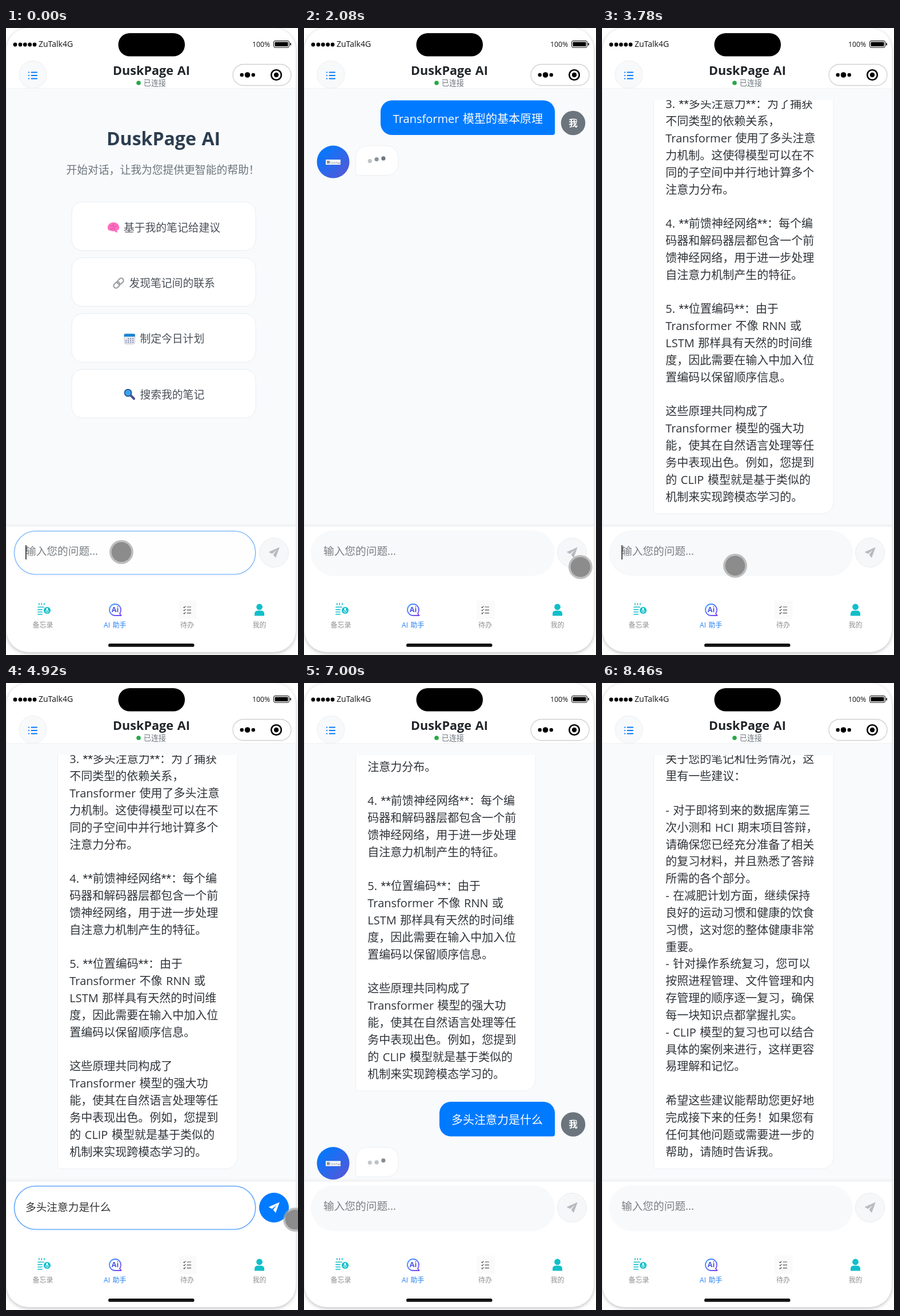
An HTML page for the animation above (9 s loop, 511x1096 px).

```html
<!DOCTYPE html>
<html lang="zh-CN">
<head>
<meta charset="utf-8">
<title>DuskPage AI</title>
<style>
  html, body { margin: 0; width: 100%; height: 100%; overflow: hidden; background: #fff; }
  svg { display: block; width: 100vw; height: 100vh; }
  text { font-family: 'Open Sans', 'Noto Sans CJK SC', 'Noto Sans CJK', sans-serif; white-space: pre; word-spacing: 1.3px; }
  .star { font-family: Roboto, sans-serif; }
  .phone { filter: drop-shadow(0 2px 3px rgba(0, 0, 0, .25)); }
</style>
</head>
<body>
<svg id="stage" viewBox="0 0 511 1096" xmlns="http://www.w3.org/2000/svg"></svg>
<script>
const LOOP = 9000;
const BRAND = 'DuskPage AI';
const BLUE = '#007aff';
const ASK = ['Transformer 模型的基本原理', '多头注意力是什么'];
const SENT = [1960, 5120];
const ANSWERED = [3460, 7480];

const ANSWER_1 = `3. **多头注意力**：为了捕获
不同类型的依赖关系，
Transformer 使用了多头注意
力机制。这使得模型可以在不
同的子空间中并行地计算多个
注意力分布。

4. **前馈神经网络**：每个编
码器和解码器层都包含一个前
馈神经网络，用于进一步处理
自注意力机制产生的特征。

5. **位置编码**：由于
Transformer 不像 RNN 或
LSTM 那样具有天然的时间维
度，因此需要在输入中加入位
置编码以保留顺序信息。

这些原理共同构成了
Transformer 模型的强大功
能，使其在自然语言处理等任
务中表现出色。例如，您提到
的 CLIP 模型就是基于类似的
机制来实现跨模态学习的。`;

const ANSWER_2 = `关于您的笔记和任务情况，这
里有一些建议：

- 对于即将到来的数据库第三
次小测和 HCI 期末项目答辩，
请确保您已经充分准备了相关
的复习材料，并且熟悉了答辩
所需的各个部分。
- 在减肥计划方面，继续保持
良好的运动习惯和健康的饮食
习惯，这对您的整体健康非常
重要。
- 针对操作系统复习，您可以
按照进程管理、文件管理和内
存管理的顺序逐一复习，确保
每一块知识点都掌握扎实。
- CLIP 模型的复习也可以结合
具体的案例来进行，这样更容
易理解和记忆。

希望这些建议能帮助您更好地
完成接下来的任务！如果您有
任何其他问题或需要进一步的
帮助，请随时告诉我。`;

// ---------- drawing helpers ----------
const text = (x, y, size, fill, str, extra = '') =>
  `<text x="${x}" y="${y}" font-size="${size}" fill="${fill}" ${extra}>${str}</text>`;
const rect = (x, y, w, h, r, fill, extra = '') =>
  `<rect x="${x}" y="${y}" width="${w}" height="${h}" rx="${r}" fill="${fill}" ${extra}/>`;
const circle = (x, y, r, fill, extra = '') =>
  `<circle cx="${x}" cy="${y}" r="${r}" fill="${fill}" ${extra}/>`;
const path = (d, fill, extra = '') => `<path d="${d}" fill="${fill}" ${extra}/>`;
const group = (id, body, extra = '') => `<g id="${id}" ${extra}>${body}</g>`;
const mid = 'text-anchor="middle"';

// Rounded bubble with one tight bottom corner.
function bubble(x0, y0, x1, y1, tail, fill, extra) {
  const R = 20, br = tail === 'right' ? 4 : R, bl = tail === 'left' ? 4 : R;
  return path(`M${x0 + R} ${y0}H${x1 - R}a${R} ${R} 0 0 1 ${R} ${R}V${y1 - br}` +
    `a${br} ${br} 0 0 1 ${-br} ${br}H${x0 + bl}a${bl} ${bl} 0 0 1 ${-bl} ${-bl}V${y0 + R}` +
    `a${R} ${R} 0 0 1 ${R} ${-R}z`, fill, extra);
}
const edge = 'stroke="#eceff2"';

function answer(id, str) {
  const lines = str.split('\n');
  const body = lines.map((line, i) => text(111.3, 826.5 - 29.83 * (lines.length - 1 - i), 20, '#2f3338',
    line.replace(/\*\*/g, '<tspan class="star">**</tspan>'))).join('');
  return group(id, bubble(90.5, 40, 405, 849, 'left', '#fff', edge) + body);
}

// A question on the right, the waiting reply on the left.
function turn(id, left, str) {
  const dots = [0, 1, 2].map(i => circle(115.3 + 11.8 * i, 0, 3.6, '#6c757d', 'class="dot"')).join('');
  return group(id,
    bubble(left, 126.5, 439, 187, 'right', BLUE, '') +
    text(418, 165.5, 20, '#fff', str, 'text-anchor="end" font-weight="500"') +
    circle(471, 166, 21.3, '#6c757d') +
    text(471, 171.8, 15.5, '#fff', '我', mid + ' font-weight="700"') +
    circle(51, 234, 28.5, 'url(#bot)') +
    rect(38, 230, 26, 9, 0, '#f4f6f8') + rect(40, 232, 5, 5, 0, '#8a949c') +
    text(46, 236.6, 4, '#6c757d', 'DuskPage') +
    bubble(90.5, 206, 165, 257.5, 'left', '#fff', edge) + dots);
}

// ---------- pieces ----------
const brain = path('M178 350c-1-5 3-9 8-10 6-1 11 2 12 7 1 4-1 6-4 7l1 3c-3 1-4-1-5-2-3 1-5 0-7-1-3 0-5-1-5-4z', '#ff6fc0') +
  path('M182 347q3-3 6 0t6-1M183 352q4-3 7 0M188 342v3', 'none', 'stroke="#d63f9c" stroke-linecap="round"');
const link = `<g fill="none" stroke="#9a9da1" stroke-width="2.2" transform="rotate(-45 197 446)">` +
  rect(186.5, 442, 12, 8, 4, 'none') + rect(195.5, 442, 12, 8, 4, 'none') + '</g>';
const calendar = rect(207, 535, 18.5, 17.5, 3, '#e9eaf0', 'stroke="#bfc3d0" stroke-width=".8"') +
  path('M206.6 539.5v-3a2 2 0 0 1 2-2h15.3a2 2 0 0 1 2 2v3z', '#1583d6') +
  Array.from({ length: 11 }, (_, i) =>
    rect(209 + 4 * ((i + 1) % 4), 542 + 3.3 * Math.floor((i + 1) / 4), 2.3, 2, .5, '#8b94b4')).join('');
const lens = path('M218 642l6 6', 'none', 'stroke="#4a4f8f" stroke-width="4" stroke-linecap="round"') +
  circle(213.5, 637.8, 6, '#35a5ef', 'stroke="#33599b" stroke-width="2"');

const cards = [['基于我的笔记给建议', 206, brain], ['发现笔记间的联系', 215.5, link],
  ['制定今日计划', 234.5, calendar], ['搜索我的笔记', 234.5, lens]]
  .map(([label, x, icon], i) => rect(115, 304 + 97.6 * i, 322, 85, 19, '#fff', 'stroke="#e9ecef"') +
    icon + text(x, 355.6 + 97.4 * i, 18.8, '#495057', label)).join('');

const welcome = group('welcome',
  text(275.5, 205, 32, '#2c3e50', BRAND, mid + ' font-weight="700"') +
  text(105.5, 255, 18.8, '#6c757d', '开始对话，让我为您提供更智能的帮助！') + cards);

const header =
  [16, 25, 33.3, 41.7, 50].map(x => circle(x, 29, 3.4, '#000')).join('') +
  text(57, 33, 14, '#111', 'ZuTalk4G') +
  rect(196.5, 9, 116.5, 40.5, 20, '#000') +
  text(431, 33, 12.3, '#111', '100%') +
  rect(468.5, 22.5, 27, 11.5, 2.5, '#fff', 'stroke="#000"') + rect(470.5, 24.5, 23, 7.5, 1, '#000') +
  rect(497, 26, 1.8, 4.5, .8, '#000') +
  circle(47, 81.5, 24, '#f8f9fa', 'stroke="#eceef0"') +
  [77.5, 83, 88.5].map(y => rect(39, y - 1, 2, 2, .6, BLUE) + rect(43.5, y - .9, 11.5, 1.8, .9, BLUE)).join('') +
  text(254.5, 82, 21.6, '#212529', BRAND, mid + ' font-weight="700"') +
  circle(232, 96, 3.8, '#28a745') + text(240.8, 100.6, 13.1, '#6c757d', '已连接') +
  rect(397, 63.5, 102, 37, 18.5, '#fff', 'stroke="#d0d0d0" stroke-width="1.3"') +
  circle(412.7, 82, 3.2, '#000') + circle(422.5, 82, 4.8, '#000') + circle(432.7, 82, 3.2, '#000') +
  circle(473, 82, 8.8, 'none', 'stroke="#000" stroke-width="2.6"') + circle(473, 82, 4.2, '#000');

const composer = rect(1, 866, 506, 6, 0, 'url(#lift)') + rect(1, 871.5, 506, 160, 0, '#fff') +
  rect(12, 878, 427, 80, 40, '#f8f9fa', 'id="idle"') +
  group('focus', rect(13.5, 878.5, 424, 78, 38, 'none', 'stroke="#007bff" stroke-opacity=".05" stroke-width="4"') +
    rect(14.7, 879.5, 421.8, 75.5, 37, '#fff', 'stroke="#2b8afa" stroke-width="1.1"')) +
  text(34, 920.5, 18.7, '#7b7f83', '输入您的问题...', 'id="hint"') +
  text(34, 923.2, 18.7, '#333', '', 'id="entry"') +
  rect(0, 904, 1.5, 25, 0, '#111', 'id="caret"') +
  circle(469, 917, 25.5, '#f6f7f8', 'id="send"') +
  path('M478.8 907.5L459.5 916l6 3.2 8.3-6.6-6.3 8.2 4.4 5.4z', '#b7bbbf', 'id="plane" stroke-linejoin="round"');

const TEAL = '#10bfca';
const tabs =
  [1011.5, 1015.8, 1020, 1024].map((y, i) => rect(55, y, i ? 9 : 12, 1.6, .8, TEAL)).join('') +
  [57, 61.5, 66].map(x => rect(x, 1005, 1.6, 4, .8, TEAL)).join('') +
  circle(72, 1018, 6, TEAL) + rect(70.6, 1013.8, 2.8, 5, 1.4, '#fff') +
  path('M69 1018a3 3 0 0 0 6 0M72 1021v1.5', 'none', 'stroke="#fff" stroke-width=".9"') +
  path('M201.5 1027h-10.5a10 10 0 1 1 10-10q0 4-2 6.5z', '#fff', 'stroke="url(#ring)" stroke-width="1.8" stroke-linejoin="round"') +
  text(191, 1021.3, 12.5, '#4b55e8', 'Ai', mid + ' font-weight="700"') +
  rect(302, 1001, 31.5, 32, 1, '#fafafa') +
  [1012, 1017.3, 1022.6].map(y => path(`M310.5 ${y}l1.4 1.4 2.4-2.8M316.5 ${y}h7.5`, 'none', 'stroke="#555" stroke-width="1.2"')).join('') +
  circle(443.5, 1012, 5.4, TEAL) + path('M435 1027.5v-3.5q0-5.5 6-5.5h5q6 0 6 5.5v3.5z', TEAL) +
  ['备忘录', 'AI 助手', '待办', '我的'].map((label, i) =>
    text(64.5 + 126.3 * i, 1048.3, 12, i === 1 ? '#2580f5' : '#8f8f8f', label, mid)).join('') +
  rect(179, 1076, 150.5, 5.8, 2.9, '#111');

const pointers =
  group('touch', circle(0, 0, 21, '#a4a4a4', 'opacity=".7"') + circle(0, 0, 17.3, '#8c8c8c')) +
  group('arrow', path('M0 0V19.5l4.6-4.2 3.2 7.6 3.4-1.4-3.2-7.4h6.4z', '#fff', 'stroke="#222" stroke-width="1.1"'));

const stop = (at, color, op = 1) => `<stop offset="${at}" stop-color="${color}" stop-opacity="${op}"/>`;
document.getElementById('stage').innerHTML =
  `<defs>
    <linearGradient id="bot" x2="1" y2="1">${stop(.1, BLUE) + stop(.95, '#5856d6')}</linearGradient>
    <linearGradient id="ring" x2="1" y2="1">${stop(0, '#38a5ff') + stop(1, '#7b3ff2')}</linearGradient>
    <linearGradient id="lift" x2="0" y2="1">${stop(0, '#000', 0) + stop(1, '#000', .05)}</linearGradient>
    <clipPath id="view"><rect x="1" y="126" width="506" height="745"/></clipPath>
  </defs>` +
  rect(1, 0, 506, 1091, 38, '#fff', 'class="phone"') +
  rect(1, 106, 506, 766, 0, '#f8fafc') + rect(1, 105, 506, 1, 0, '#f0f1f3') + header +
  `<g clip-path="url(#view)">${welcome + turn('turn1', 134, ASK[0]) + answer('answer1', ANSWER_1) +
    turn('turn2', 237, ASK[1]) + answer('answer2', ANSWER_2)}</g>` +
  composer + tabs + pointers;

const el = {};
document.querySelectorAll('#stage [id]').forEach(node => el[node.id] = node);
const dots = document.querySelectorAll('.dot');
const show = (node, on) => node.setAttribute('display', on ? 'inline' : 'none');
const move = (node, x, y) => node.setAttribute('transform', `translate(${x} ${y})`);
const clamp = v => Math.max(0, Math.min(1, v));
const smooth = u => u * u * (3 - 2 * u);

// ---------- typing ----------
const keys = [];
function spell(start, step, before, letters) {
  for (let i = 1; i <= letters.length; i++) keys.push([start + step * (i - 1), before + letters.slice(0, i)]);
}
spell(20, 40, '', 'Transformer');
keys.push([580, 'Transformer ']);
spell(620, 60, 'Transformer ', 'moxingde');
keys.push([1180, 'Transformer 模型的']);
spell(1240, 20, 'Transformer 模型的', 'jibenyuanli');
keys.push([1480, ASK[0]], [SENT[0], '']);
spell(3800, 30, '', 'duotouzhuyilishishenme');
keys.push([4480, ASK[1]], [SENT[1], '']);

// ---------- pointer: each run is a list of [time, x, y] ----------
const touchRuns = [
  [[0, 202, 916], [20, 202, 916]],
  [[1520, 223, 924], [1580, 540, 969]],
  [[1720, 532, 960], [1900, 468, 925], [1980, 468, 925], [2300, 535, 998]],
  [[3580, 532, 965], [3740, 233, 940], [3800, 233, 940]],
  [[4520, 233, 940], [4720, 500, 972], [4900, 506, 938], [4960, 506, 938], [5080, 468, 922],
    [5160, 468, 922], [5420, 506, 742], [5480, 506, 742], [5620, 540, 740]],
  [[7880, 512, 751], [7900, 506, 751], [8160, 506, 751], [8280, 350, 900], [8460, 380, 1120]]
];
const arrowRuns = [[20, 1520, 213, 930], [3800, 4520, 233, 940]];

function touchAt(t) {
  const run = touchRuns.find(r => t >= r[0][0] && t < r[r.length - 1][0]);
  if (!run) return null;
  const i = run.findIndex(p => p[0] > t);
  const [t0, x0, y0] = run[i - 1], [t1, x1, y1] = run[i];
  const k = smooth((t - t0) / (t1 - t0));
  return [x0 + (x1 - x0) * k, y0 + (y1 - y0) * k];
}

function drawDots(t) {
  const period = 690;
  dots.forEach((dot, n) => {
    const phase = (((t - 3380) / period + .3 - (n % 3 - 1) / 7) % 1 + 1) % 1;
    const lift = smooth(clamp(1 - Math.abs(phase - .3) / .3));
    dot.setAttribute('cy', 232.8 - 5 * lift);
    dot.setAttribute('opacity', .4 + .6 * lift);
  });
}

function draw(t) {
  show(el.welcome, t < SENT[0]);
  show(el.turn1, t >= SENT[0] && t < ANSWERED[0]);
  show(el.answer1, t >= ANSWERED[0] && t < ANSWERED[1]);
  show(el.turn2, t >= SENT[1] && t < ANSWERED[1]);
  show(el.answer2, t >= ANSWERED[1]);
  move(el.answer1, 0, t >= SENT[1] ? -136 : 0);
  move(el.turn2, 0, 605.5);
  drawDots(t);

  const last = keys.filter(k => k[0] <= t).pop() || [0, ''];
  const typed = last[1];
  el.entry.textContent = typed;
  show(el.hint, !typed);
  el.send.setAttribute('fill', typed ? BLUE : '#f6f7f8');
  el.send.setAttribute('stroke', typed ? BLUE : '#eaecee');
  el.plane.setAttribute('fill', typed ? '#fff' : '#b7bbbf');

  const focused = t < SENT[0] || (t >= 3760 && t < SENT[1]);
  const glow = t < SENT[0] ? clamp(.75 + t / 400)
    : t < SENT[1] ? Math.max(clamp((t - 3780) / 120), clamp(1 - (t - SENT[0]) / 80))
    : clamp(1 - (t - SENT[1]) / 80);
  el.focus.setAttribute('opacity', glow);
  el.idle.setAttribute('opacity', 1 - glow);
  const since = t - (t >= 3760 ? Math.max(last[0], 3760) : last[0]);
  show(el.caret, focused && since % 530 < 265);
  el.caret.setAttribute('x', 34.2 + (typed ? el.entry.getComputedTextLength() : 0));

  const spot = touchAt(t);
  show(el.touch, spot);
  if (spot) move(el.touch, ...spot);
  const rest = arrowRuns.find(([from, to]) => t >= from && t < to);
  show(el.arrow, rest);
  if (rest) move(el.arrow, rest[2], rest[3]);
}

const begin = performance.now();
function tick() {
  draw((performance.now() - begin) % LOOP);
  requestAnimationFrame(tick);
}
tick();
</script>
</body>
</html>
```
